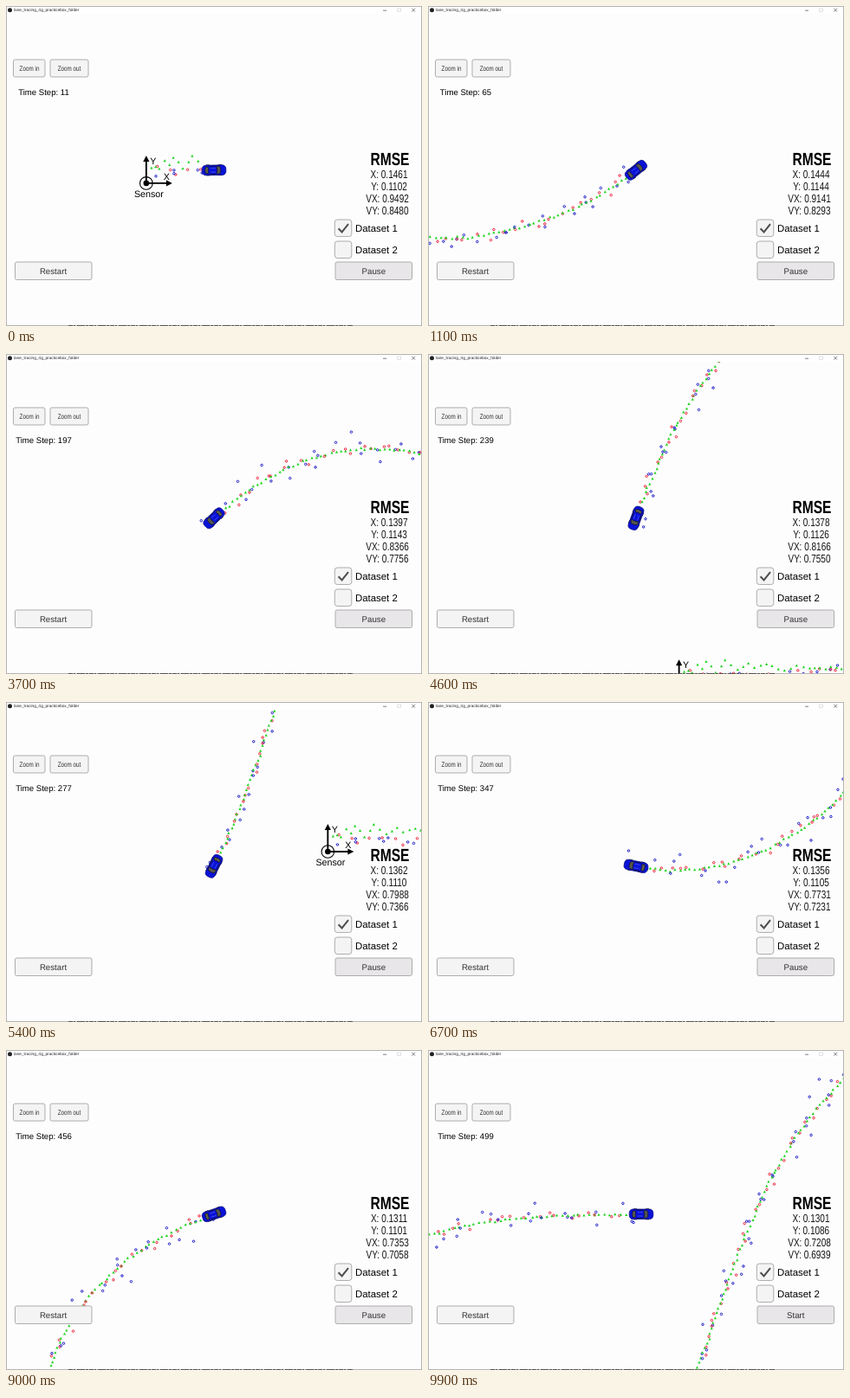
An HTML page for the animation above (10 s loop, 480 by 370 pixels).

```html
<!DOCTYPE html>
<html lang="en">
<head>
<meta charset="utf-8">
<title>Tracking simulator</title>
<style>
  html, body { margin: 0; width: 100%; height: 100%; overflow: hidden; background: #fefdfe; }
  svg { display: block; width: 480px; height: 370px; }
  text { font-family: "Liberation Sans", Arial, sans-serif; text-rendering: geometricPrecision; }
  .mid { text-anchor: middle; }
  .btn { fill: #f4f4f4; stroke: #adadad; stroke-width: 1; }
  .label { font-size: 9.7px; fill: #323232; text-anchor: middle; }
  .lidar, .radar { fill: none; stroke-width: .95; }
  .lidar { stroke: #e81c34; }
  .radar { stroke: #1414c4; }
  .guess { fill: #1fd41f; }
</style>
</head>
<body>
<svg viewBox="0 0 480 370">
  <defs>
    <clipPath id="view"><rect y="9" width="480" height="360"/></clipPath>
  </defs>
  <rect width="480" height="370" fill="#fefdfe"/>

  <g clip-path="url(#view)">
    <g id="world">
      <circle r="7.3" fill="none" stroke="#000" stroke-width="1.1"/>
      <circle r="3.3"/>
      <path d="M0 0V-27M0 0H25" stroke="#000" stroke-width="1.9"/>
      <path d="M0 -32l-3.6 7h7.2zM30 0l-7 -3.6v7.2z"/>
      <text class="mid" x="8" y="-22" font-size="10.7">Y</text>
      <text class="mid" x="23.6" y="-4" font-size="10.7">X</text>
      <text class="mid" x="3" y="16" font-size="10.7">Sensor</text>
      <g id="trail"></g>
      <g id="car">
        <path d="M-9 -5.9h4M5 -5.9h4M-9 5.9h4M5 5.9h4" stroke="#111" stroke-width="1"/>
        <rect x="-13.8" y="-5.8" width="27.6" height="11.6" rx="4.2" fill="#0a12d8" stroke="#070a78" stroke-width=".7"/>
        <path d="M3 -4.6q4 .2 4.4 1.4q.8 3.2 0 6.4q-.4 1.2 -4.4 1.4q1.4 -4.6 0 -9.2z" fill="#55564e" stroke="#10102a" stroke-width=".7"/>
        <path d="M-9.6 -3.9l3.2 .5q-1 3.4 0 6.8l-3.2 .5q-1.4 -3.9 0 -7.8z" fill="#60604a" stroke="#10102a" stroke-width=".7"/>
        <path d="M-5.5 -4.7H2M-5.5 4.7H2" stroke="#10102a" stroke-width=".8"/>
        <path d="M-4 -2.2H2M-4 2.2H2" stroke="#4d5cf2" stroke-width=".7"/>
      </g>
    </g>
  </g>

  <rect width="480" height="9" fill="#fff"/>
  <circle cx="4.5" cy="4.7" r="2.5" fill="#222"/>
  <text x="9" y="6.4" font-size="4.75" fill="#222">lane_tracing_rig_practicebox_folder</text>
  <path d="M435 5.2h4M468.3 2.8l3.8 3.8m0 -3.8l-3.8 3.8" stroke="#444" stroke-width=".7"/>
  <rect x="451.7" y="3" width="3.6" height="3.6" fill="none" stroke="#ccc" stroke-width=".6"/>
  <rect x=".5" y=".5" width="479" height="369" fill="none" stroke="#b4b4b4"/>
  <path d="M72 369.5H400" stroke="#555" stroke-dasharray="5 1 2 2 9 1 3 1"/>

  <rect class="btn" x="8.5" y="62" width="36.5" height="20" rx="2"/>
  <rect class="btn" x="51" y="62" width="44" height="20" rx="2"/>
  <rect class="btn" x="10.5" y="296" width="88.5" height="20.5" rx="2"/>
  <rect class="btn" x="380" y="296" width="88.5" height="20.5" rx="2" style="fill:#e8e6e8"/>
  <text class="label" x="54.5" y="310">Restart</text>
  <text class="label" x="424.3" y="310" id="run"></text>
  <text class="mid" x="43.5" y="103.1" font-size="9.6" id="step"></text>

  <g id="narrow"></g>

  <rect class="btn" x="379.3" y="247" width="19.5" height="19.5" rx="3"/>
  <rect class="btn" x="379.3" y="272" width="19.5" height="19.5" rx="3"/>
  <path d="M383.6 257.2l4 4.2l7.4 -9.2" fill="none" stroke="#505050" stroke-width="2.1"/>
  <text x="403" y="260.9" font-size="11.4">Dataset 1</text>
  <text x="403" y="285.9" font-size="11.4">Dataset 2</text>
</svg>

<script>
const SCALE = 23.3, STEPS = 500, LAST = STEPS - 1, FRAMES = 100, FRAME_MS = 100;
const NS = 'http://www.w3.org/2000/svg';
const $ = id => document.getElementById(id);

function add(parent, tag, attrs) {
  const el = parent.appendChild(document.createElementNS(NS, tag));
  for (const name in attrs) el.setAttribute(name, attrs[name]);
  return el;
}

// Key points: frame, time step, then the errors X, Y, VX, VY
const keys = [
  [0, 10.6, .1461, .1102, .9492, .8480],
  [23, 123.4, .1425, .1190, .8758, .8088],
  [37, 197, .1397, .1143, .8366, .7756],
  [54, 277, .1362, .1110, .7988, .7366],
  [67, 347, .1356, .1105, .7731, .7231],
  [80, 407, .1322, .1118, .7515, .7191],
  [99, 500, .1301, .1086, .7208, .6939]
];

function sample(frame) {
  const i = keys.findIndex(key => frame <= key[0]) || 1;
  const a = keys[i - 1], b = keys[i], u = (frame - a[0]) / (b[0] - a[0]);
  return a.map((v, n) => v + (b[n] - v) * u);
}

// Figure of eight: yaw rate and speed are sinusoids of the step
const yaw = k => .55 * 25 / (2 * Math.PI) * (1 - Math.cos(2 * Math.PI * k / STEPS));
const speed = k => 5 + .2 * Math.cos(4 * Math.PI * k / STEPS);
const path = [[.6, .6]];
for (let k = 0; k <= STEPS; k++) {
  const [x, y] = path[k], d = .05 * speed(k + .5), a = yaw(k + .5);
  path.push([x + d * Math.cos(a), y + d * Math.sin(a)]);
}

const toPixels = (x, y) => [x * SCALE, -y * SCALE];
function place(k) {
  const i = Math.floor(k), u = k - i;
  return toPixels(...path[i].map((v, n) => v + (path[i + 1][n] - v) * u));
}

let seed = 20170;
function rand() {
  seed = (seed * 16807) % 2147483647;
  return seed / 2147483647;
}
const gauss = () => (rand() + rand() + rand() + rand() - 2) * 1.73;

// Lidar and radar take turns; radar is noisier with distance
function reading(k) {
  const [x, y] = path[k];
  if (k % 2 === 0) return toPixels(x + .15 * gauss(), y + .15 * gauss());
  const r = Math.hypot(x, y) + .28 * gauss(), a = Math.atan2(y, x) + .026 * gauss();
  return toPixels(r * Math.cos(a), r * Math.sin(a));
}

// The filter is off at first, then settles on the path
function estimate(k) {
  const [x, y] = path[k], off = Math.exp(-(((k - 9) / 12) ** 2));
  return toPixels(x - .6 * off + .03 * gauss(), y + .5 * off + (.03 + .12 * off) * gauss());
}

const marks = [];
for (let k = 0; k < STEPS; k++) {
  const g = add($('trail'), 'g', {});
  const [cx, cy] = reading(k), [x, y] = estimate(k);
  add(g, 'circle', { class: k % 2 ? 'radar' : 'lidar', cx, cy, r: 1.25 });
  add(g, 'path', { class: 'guess', d: `M${x} ${y - 1.7}l1.6 3h-3.2z` });
  marks.push(g);
}

// Condensed lettering
function narrow(x, y, size, text, extra) {
  const el = add($('narrow'), 'text', {
    class: 'mid', transform: `translate(${x} ${y}) scale(.76 1)`, 'font-size': size, ...extra
  });
  el.textContent = text;
  return el;
}
narrow(27, 75, 8.3, 'Zoom in', { fill: '#323232' });
narrow(73, 75, 8.3, 'Zoom out', { fill: '#323232' });
narrow(443, 184.4, 20.5, 'RMSE', { 'font-weight': 'bold' });
const errors = ['X', 'Y', 'VX', 'VY'].map((name, i) => ({
  name, el: narrow(i < 2 ? 442 : 440, 198.8 + 14.2 * i, 13.2, '', { fill: '#151515' })
}));

let shown = -1;
function draw(frame) {
  const [, k, ...rmse] = sample(frame);
  const [camX, camY] = place(Math.min(k, LAST)), [x, y] = place(k);
  $('world').setAttribute('transform', `translate(${240 - camX} ${190.5 - camY})`);
  $('car').setAttribute('transform', `translate(${x} ${y - .7}) rotate(${-yaw(k) * 180 / Math.PI})`);
  marks.forEach((m, i) => m.style.display = i <= k ? '' : 'none');
  $('step').textContent = 'Time Step: ' + Math.min(LAST, Math.round(k));
  $('run').textContent = k < STEPS ? 'Pause' : 'Start';
  errors.forEach(({ name, el }, i) => el.textContent = `${name}: ${rmse[i].toFixed(4)}`);
}

const start = performance.now();
function tick() {
  const frame = Math.floor(Math.max(0, performance.now() - start) / FRAME_MS) % FRAMES;
  if (frame !== shown) draw(shown = frame);
  requestAnimationFrame(tick);
}
tick();
</script>
</body>
</html>
```
